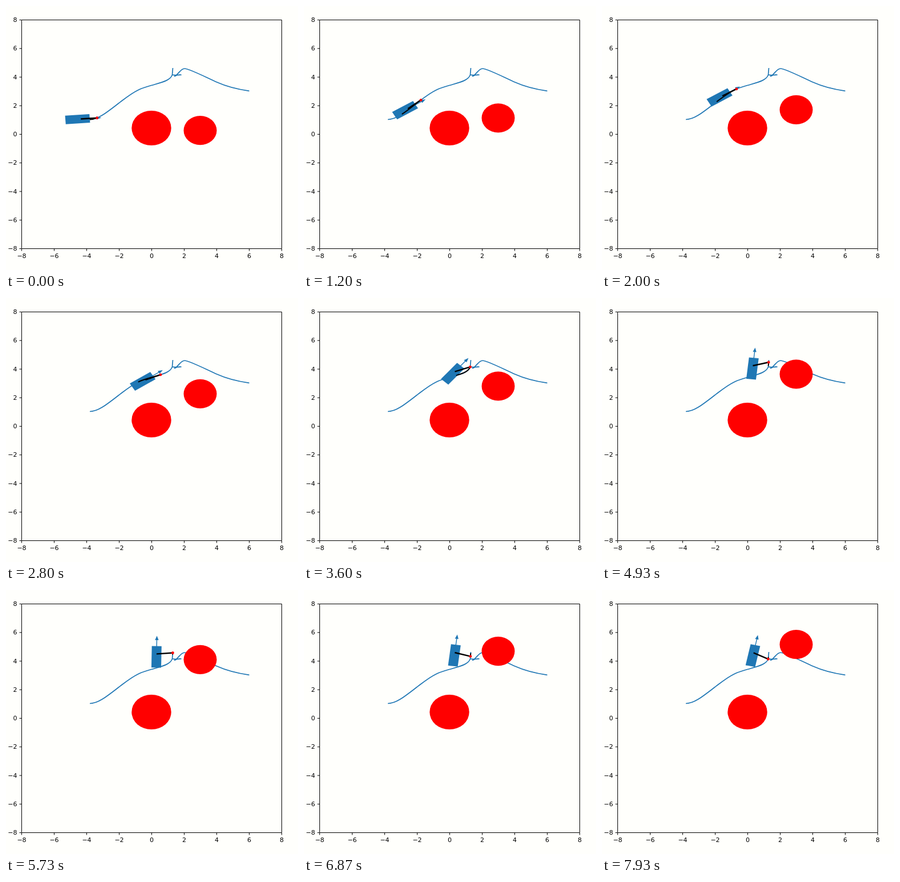
Animation, 512 px wide and 464 px high, one loop 8 s. Source, as an HTML page:

```html
<!DOCTYPE html>
<html lang="en">
<head>
<meta charset="utf-8">
<title>Mobile arm following a path</title>
<style>
  html, body { margin: 0; width: 100%; height: 100%; overflow: hidden; background: #fffffc; }
  svg { display: block; width: 512px; height: 464px; }
  text { font: 11px "DejaVu Sans", sans-serif; }
  .route { fill: none; stroke: #1f77b4; stroke-width: 1.7; stroke-linejoin: round; }
  #arm { stroke: #000; stroke-width: 2.4; }
  #trail { fill: none; stroke: #000; stroke-width: 1.9; }
  #axes { fill: none; stroke: #000; }
  #car { fill: #1f77b4; }
  #car line { stroke: #1f77b4; stroke-width: 1.4; vector-effect: non-scaling-stroke; }
</style>
</head>
<body>
<svg viewBox="0 0 512 464">
  <path id="route" class="route" d="M147 199.5C163 199.5 179 185 204 166S236 145 255 139.5S288 131 291.5 121L292.5 109"/>
  <path class="route" d="M291.5 121Q297 122 307 121Q301 120.5 295.5 123.5C302 121 306 110 313 110C321 110 350 125 370 134S410 147 426.5 149.3"/>
  <g id="car">
    <rect x="-.75" y="-.3" width="1.5" height=".6"/>
    <line x2="1.2"/>
    <path d="M1.17 .11L1.47 0L1.17 -.11"/>
  </g>
  <g fill="#f00">
    <ellipse cx="255" cy="214.5" rx="34.7" ry="30.6"/>
    <ellipse id="mover" cx="340.5" rx="29" ry="25.6"/>
  </g>
  <path id="trail"/>
  <line id="arm"/>
  <circle id="tip" r="2.4" fill="#f00"/>
  <path id="axes"/>
  <g id="labels"></g>
</svg>
<script>
const $ = id => document.getElementById(id);
const set = (id, attrs) => Object.entries(attrs).forEach(([k, v]) => $(id).setAttribute(k, v));

const UNIT_X = 28.5, UNIT_Y = 25.125;   // pixels per axis unit
const FPS = 15, FRAMES = 120, TRAIL_SECONDS = .9;
const RAD = Math.PI / 180;

const clamp = (v, lo, hi) => Math.min(Math.max(v, lo), hi);

// Eased step from 0 to 1 between two times.
function ease(t, from, to) {
  const s = clamp((t - from) / (to - from), 0, 1);
  return s * s * (3 - 2 * s);
}

// Angles in degrees, times in seconds.
const heading = t => 4 + 27 * ease(t, 0, 1.2) + 58 * ease(t, 2.5, 5.5) - 11 * ease(t, 5.7, 7.9);
const armAngle = t => 4 + 33 * ease(t, 0, 1.2) - 16 * ease(t, 1.2, 2.8)
  - 6 * ease(t, 2.8, 4.9) - 41 * ease(t, 4.6, 8);

// Distance of the gripper along the route: cruise, then out to the cusp and back.
function travel(t) {
  const detour = clamp((t - 3.4) / 4.5, 0, 1);
  return clamp(13 + 46 * t, 0, 167) + 11 * Math.sin(Math.PI * detour) ** 2;
}

const moverHeight = t => .25 + 5.88 * Math.sin(.124 * t);

// Point a number of axis units away from p.
const offset = (p, units, deg) => ({
  x: p.x + units * UNIT_X * Math.cos(deg * RAD),
  y: p.y - units * UNIT_Y * Math.sin(deg * RAD)
});

function drawAxes() {
  let ticks = "M27.5 24.5H483.5V426.5H27.5Z", labels = "";
  for (let v = -8; v <= 8; v += 2) {
    const x = 255.5 + v * UNIT_X, y = 225.5 - v * UNIT_Y;
    const name = String(v).replace("-", "\u2212");
    ticks += `M${x} 427v3.5M27 ${y}h-3.5`;
    labels += `<text x="${x}" y="442.5" text-anchor="middle">${name}</text>` +
      `<text x="19.5" y="${y + 3.5}" text-anchor="end">${name}</text>`;
  }
  set("axes", { d: ticks });
  $("labels").innerHTML = labels;
}

function draw(t) {
  const tip = $("route").getPointAtLength(travel(t));
  const base = offset(tip, -1, armAngle(t));
  const car = offset(base, -.2, heading(t));
  set("tip", { cx: tip.x, cy: tip.y });
  set("arm", { x1: base.x, y1: base.y, x2: tip.x, y2: tip.y });
  set("car", { transform: `matrix(${UNIT_X} 0 0 ${-UNIT_Y} ${car.x} ${car.y}) rotate(${heading(t)})` });

  const recent = Array.from({ length: 10 }, (_, i) => travel(t - TRAIL_SECONDS * i / 9));
  const from = Math.min(...recent), to = Math.max(...recent);
  set("trail", { "stroke-dasharray": `0 ${from} ${to - from} 999` });
  set("mover", { cy: 225 - UNIT_Y * moverHeight(t) });
}

drawAxes();
set("trail", { d: $("route").getAttribute("d") });

const start = performance.now();
function tick() {
  const seconds = (performance.now() - start + 4) / 1000;
  draw(Math.floor(seconds * FPS) % FRAMES / FPS);
  requestAnimationFrame(tick);
}
tick();
</script>
</body>
</html>
```
